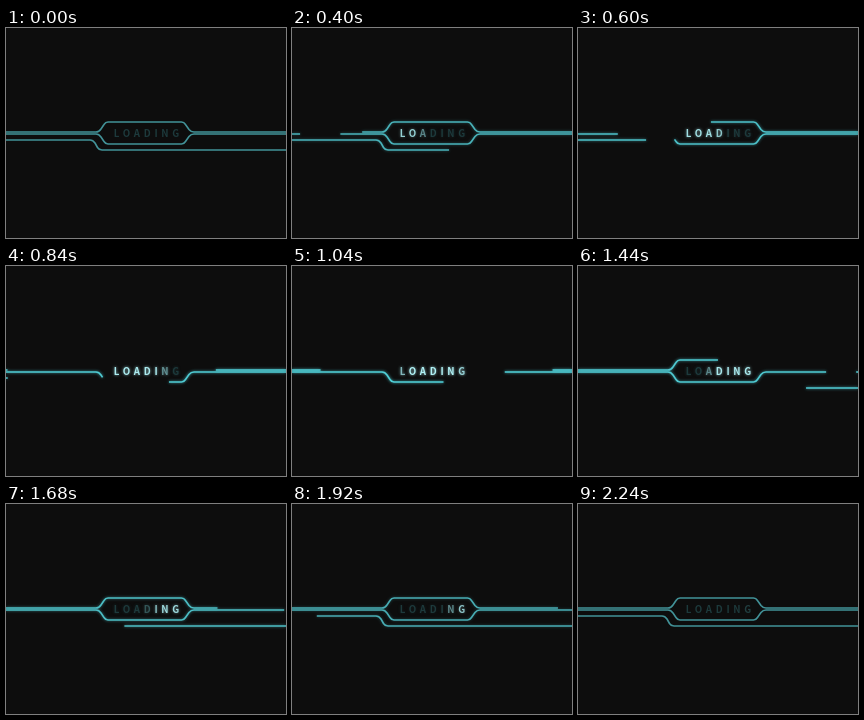
Write an HTML page that moves like this. It is 280 by 210 pixels and loops after 2.4 s.

```html
<!DOCTYPE html>
<html lang="en">
<head>
<meta charset="utf-8">
<title>Loading</title>
<style>
  html, body { margin: 0; width: 100%; height: 100%; overflow: hidden; background: #0d0d0d; }
  svg { display: block; width: 100%; height: 100%; }
  path { fill: none; stroke-width: 1.6; }
  text { font: bold 9.7px "Noto Sans CJK SC", "Noto Sans CJK JP", "Noto Sans", sans-serif; letter-spacing: 3.7px; }
</style>
</head>
<body>
<svg viewBox="0 0 280 210">
  <defs>
    <filter id="blur" filterUnits="userSpaceOnUse" x="-10" y="80" width="300" height="55">
      <feGaussianBlur stdDeviation="1.6"/>
    </filter>
  </defs>
  <use id="glow" href="#art" filter="url(#blur)"/>
  <g id="art">
    <g id="lines">
      <path id="upper" pathLength="1" d="M0 104H90Q93 104 95 101L98 96.500Q99.500 94 102 94H175.500Q178 94 179.500 96.500L183 101.500Q185 104 188 104H280"/>
      <path id="lower" pathLength="1" d="M0 106H90Q93 106 95 109L98 113.500Q99.500 116 102 116H175.500Q178 116 179.500 113.500L183 108.500Q185 106 188 106H280"/>
      <path id="side" pathLength="1" d="M0 112H84Q87 112 89 115L91.500 119.500Q93 122 96 122H280"/>
    </g>
    <text id="label" x="142.400" y="109" text-anchor="middle"></text>
  </g>
</svg>
<script>
const LOOP = 2400, STEP = 40, LAST = 2240;
const el = id => document.getElementById(id);
const letters = [...'LOADING'].map(char => {
  const span = document.createElementNS('http://www.w3.org/2000/svg', 'tspan');
  span.textContent = char;
  el('label').append(span);
  return span;
});

// Smoothstep progress of t through a time span
function ease(t, start, end) {
  const x = Math.min(1, Math.max(0, (t - start) / (end - start)));
  return x * x * (3 - 2 * x);
}

const mix = (a, b, k) => `rgb(${a.map((v, i) => Math.round(v + (b[i] - v) * k))})`;

// Leave a gap in a path between two fractions of its length
function setGap(id, from, to) {
  el(id).setAttribute('stroke-dasharray', `${from} ${to - from} ${1 - to} 2`);
}

function draw(t) {
  const power = t < LAST ? Math.sin(Math.PI * t / LAST) : 0;

  setGap('upper', ease(t, 785, 2095), ease(t, 5, 1235));
  setGap('lower', ease(t, 250, 1750), ease(t, 10, 1510));
  setGap('side', 1 - ease(t, 0, 880), 1 - ease(t, 1200, 2080));

  el('lines').setAttribute('stroke', mix([66, 146, 152], [80, 208, 216], power));
  el('glow').setAttribute('opacity', 0.85 * power);

  letters.forEach((span, i) => {
    const on = 106 + 147 * i, off = 1085 + 170 * i;
    const lit = ease(t, on - 105, on + 105) * (1 - ease(t, off - 180, off + 180));
    span.setAttribute('fill', mix([29, 58, 60], [176, 242, 246], lit * (0.6 + 0.4 * power)));
  });
}

const begin = performance.now();
function tick() {
  const t = (performance.now() - begin) % LOOP;
  draw(Math.min(LAST, Math.floor(t / STEP) * STEP));
  requestAnimationFrame(tick);
}
tick();
</script>
</body>
</html>
```
